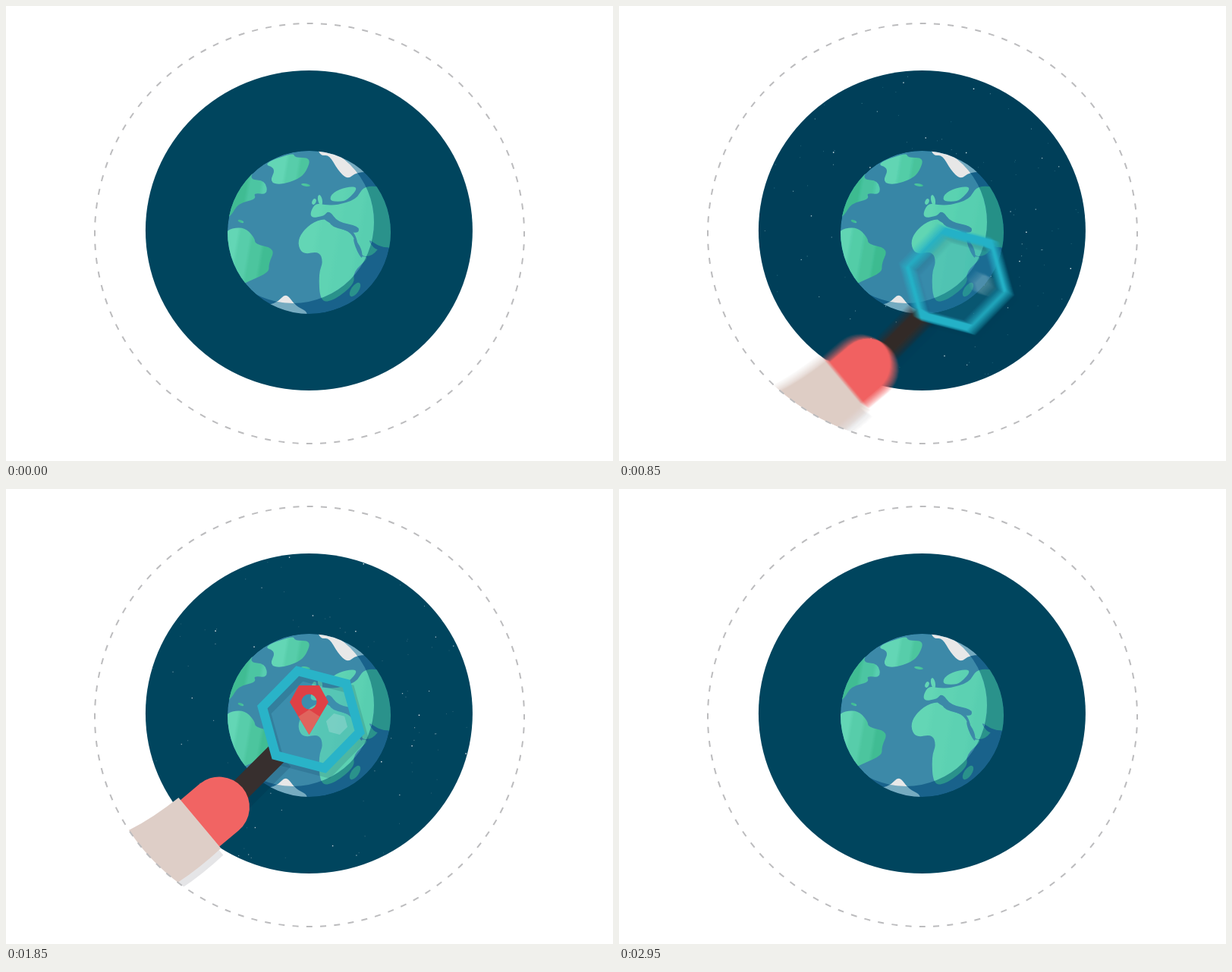
Animation of 800 by 600 pixels, one loop 3.05 s. Source, as an HTML page with a canvas:

```html
<!DOCTYPE html>
<html lang="en">
<head>
<meta charset="utf-8">
<title>Searching the globe</title>
<style>
  html, body { margin: 0; width: 100%; height: 100%; overflow: hidden; background: #fff; }
  canvas { display: block; width: 800px; height: 600px; }
</style>
</head>
<body>
<canvas id="stage" width="800" height="600"></canvas>
<script>
const LOOP = 3050, STEP = 50, LAST = 2950, TAU = Math.PI * 2;
const ctx = document.getElementById('stage').getContext('2d');
const clamp = v => Math.max(0, Math.min(1, v));

const layer = (w, h) => {
  const c = document.createElement('canvas');
  c.width = w;
  c.height = h;
  return c.getContext('2d');
};

const ellipse = (x, y, rx, ry = rx, turn = 0) => {
  const p = new Path2D();
  p.ellipse(x, y, rx, ry, turn, 0, TAU);
  return p;
};

// Regular hexagons around one centre, tilted like the magnifier
const hexagon = (x, y, ...radii) => {
  const p = new Path2D();
  for (const r of radii) {
    for (let i = 0; i < 6; i++) {
      const a = 0.253 + i * TAU / 6;
      p[i ? 'lineTo' : 'moveTo'](x + r * Math.cos(a), y + r * Math.sin(a));
    }
    p.closePath();
  }
  return p;
};

const placed = (path, x, y, degrees) => {
  const p = new Path2D();
  p.addPath(path, new DOMMatrix().translate(x, y).rotate(degrees));
  return p;
};

// Closed outline, rounded at each key point
const coast = (...pts) => {
  const p = new Path2D(), n = pts.length;
  for (let i = 0; i <= n; i++) {
    const [x, y] = pts[i % n], [u, v] = pts[(i + 1) % n];
    const mid = [(x + u) / 2, (y + v) / 2];
    if (i) p.quadraticCurveTo(x, y, ...mid); else p.moveTo(...mid);
  }
  return p;
};

// Slightly tilted bands from one green to another
const bands = (x0, x1, from, to, count = 4) => {
  const g = ctx.createLinearGradient(x0, 300, x1, 300 + (x1 - x0) * 0.17);
  for (let i = 0; i < count; i++) {
    const mix = from.map((c, k) => Math.round(c + (to[k] - c) * i / (count - 1)));
    g.addColorStop((i + 0.15) / count, `rgb(${mix})`);
    g.addColorStop((i + 0.85) / count, `rgb(${mix})`);
  }
  return g;
};

/* ---------- Globe ---------- */
const ring = ellipse(400, 300, 283, 277);
const space = ellipse(399.4, 296, 215.5, 211);
const globe = ellipse(399.5, 298.5, 107.5);
const daylight = ellipse(378, 285, 107);

const pale = [99, 214, 181], deep = [64, 188, 147], mint = [88, 206, 176];
const arctic = bands(338, 402, pale, deep);
const west = bands(290, 344, deep, mint, 3);
const south = bands(290, 356, pale, deep);
const east = bands(384, 490, pale, mint);

const lands = [
  [arctic, coast([338,208], [379,193], [380,200], [402,200], [396,218], [386,228], [362,236], [347,232], [356,214])],
  [arctic, ellipse(395, 236, 6, 1.8, 0.15)],
  [west, coast([284,262], [330,212], [320,229], [342,230], [345,249], [326,246], [330,255], [306,260], [296,278], [284,282])],
  [west, ellipse(309.5, 284, 4, 1.6, 0.4)],
  [south, coast([284,297], [313,290], [328,306], [328,314], [355,320], [346,340], [347,351], [320,363], [310,368], [284,345])],
  [east, coast([406,260], [399,280], [420,277], [425,269], [437,286], [461,297], [466,331], [484,329],
    [493,316], [520,322], [520,244], [487,237], [470,239], [462,255], [435,263], [420,262])],
  [east, coast([390,298], [384,313], [391,328], [413,323], [418,338], [412,352], [414,391], [433,388],
    [460,366], [457,351], [480,330], [464,331], [458,298], [428,291], [425,280], [406,284])],
  [east, coast([426,257], [430,246], [450,238], [465,239], [450,256], [440,258])],
  [east, ellipse(414, 256, 2.8, 7, -0.2)],
  [east, ellipse(406, 258, 2.5, 4, 0.4)],
  [east, ellipse(460, 374, 5, 10.5, 0.6)]
];
const seas = [
  coast([417,279], [426,269], [437,285], [465,290], [465,300], [448,297], [424,285]),
  coast([457,303], [469,320], [470,336], [460,318]),
  coast([476,306], [490,316], [503,319], [487,323])
];
const ice = [
  coast([408,180], [414,198], [426,196], [437,216], [450,229], [462,219], [486,219], [470,186]),
  coast([338,396], [358,391], [369,378], [382,396], [398,403], [395,414], [340,414])
];

function paintGlobe(g, ocean, snow, land) {
  g.fillStyle = ocean;
  g.fill(globe);
  for (const [fill, path] of lands) {
    g.fillStyle = land || fill;
    g.fill(path);
  }
  g.fillStyle = ocean;
  seas.forEach(p => g.fill(p));
  g.fillStyle = snow;
  ice.forEach(p => g.fill(p));
}

const earth = layer(800, 600);
earth.clip(globe);
paintGlobe(earth, '#19628b', '#76abc0', '#2a928b');
earth.clip(daylight);
paintGlobe(earth, '#3c89a8', '#e8e8e8');

/* ---------- Stars ---------- */
let seed = 41;
const rnd = () => (seed = (seed * 16807) % 2147483647) / 2147483647;
const stars = Array.from({ length: 130 }, () => {
  const a = rnd() * TAU, r = 214 * Math.sqrt(rnd()), glow = rnd() ** 3;
  return { x: Math.cos(a) * r, y: Math.sin(a) * r, size: 0.9 + 0.6 * glow, alpha: 0.2 + 0.7 * glow };
});

function drawStars(t) {
  const fade = clamp(t / 400) * clamp((LAST - t) / 300);
  const grow = 1 + 0.057 * (t - 500) / 1000;
  ctx.save();
  ctx.clip(space);
  ctx.fillStyle = '#fff';
  for (const { x, y, size, alpha } of stars) {
    ctx.globalAlpha = alpha * fade;
    ctx.fillRect(400 + x * grow - size / 2, 298 + y * grow - size / 2, size, size);
  }
  ctx.restore();
}

/* ---------- Hand with magnifier, at its resting place ---------- */
const PAD = 200, LENS = [402, 304], TIP = [281, 419.5, -40];
const frame = hexagon(...LENS, 73.3, 59.3);
const handle = placed(new Path2D('M-62-14.5V14.5H-150V-14.5Z'), ...LENS, -45);
const finger = placed(new Path2D('M-34-40H0A40 40 0 0 1 0 40H-34Z'), ...TIP);
const sleeve = placed(new Path2D('M-33-44Q-75-45-110-53L-300-105V0L-106 41Q-70 45-33 43Z'), ...TIP);

const hand = layer(800 + PAD, 800 + PAD);
hand.translate(PAD, PAD);
const paint = (path, color, dx = 0, dy = 0) => {
  hand.fillStyle = color;
  hand.fill(placed(path, dx, dy, 0), 'evenodd');
};
paint(hexagon(...LENS, 60), 'rgba(62,160,188,.25)');
paint(frame, 'rgba(0,40,75,.15)', 5, 7);
paint(handle, 'rgba(0,30,60,.14)', 7, 8);
paint(sleeve, 'rgba(20,20,40,.11)', 3, 9);
paint(hexagon(436, 310, 14.5), 'rgba(215,235,240,.26)');
paint(handle, '#372f2e');
paint(frame, '#29b3c8');
paint(finger, '#f16463');
paint(sleeve, '#decec7');

// Key points of the search: time, then offset from the resting place
const ARRIVE = 1200, LEAVE = 2400;
const search = [[100, -350, -40], [500, -138, -83], [850, 43, 57], [1000, 50, 30], [ARRIVE, 0, 0]];

function place(t) {
  if (t >= LEAVE) {
    const u = (t - LEAVE) / 150;
    return [-38 * u ** 1.5, 22 * u ** 2.4];
  }
  if (t >= ARRIVE) return [0, 0];
  t = Math.max(t, search[0][0]);
  const i = search.findIndex(p => p[0] > t) - 1;
  const a = search[i], b = search[i + 1], span = b[0] - a[0], u = (t - a[0]) / span;
  const slope = (k, d) => {
    const p = search[k - 1], q = search[k + 1];
    return p && q ? (q[d] - p[d]) / (q[0] - p[0]) * span : 0;
  };
  const ease = u * u * (3 - 2 * u);
  return [1, 2].map(d => a[d] + (b[d] - a[d]) * ease
    + u * (1 - u) * ((1 - u) * slope(i, d) - u * slope(i + 1, d)));
}

// Motion blur: running average of the scene over the shutter time
const scene = layer(800, 600);
function drawHand(t) {
  if (t <= 100 || t > 2800) return;
  const copies = t >= ARRIVE && t <= LEAVE ? 1 : 12, shutter = 36;
  const backdrop = layer(800, 600);
  backdrop.drawImage(ctx.canvas, 0, 0);
  ctx.save();
  ctx.clip(ring);
  for (let k = 0; k < copies; k++) {
    const [x, y] = place(t + ((k + 0.5) / copies - 0.5) * shutter);
    scene.drawImage(backdrop.canvas, 0, 0);
    scene.drawImage(hand.canvas, x - PAD, y - PAD);
    ctx.globalAlpha = 1 / (k + 1);
    ctx.drawImage(scene.canvas, 0, 0);
  }
  ctx.restore();
}

/* ---------- Map pin ---------- */
const pin = new Path2D('M374 281L386 259H413L425 281L399.5 324Z');
pin.addPath(ellipse(399.5, 280.5, 10));
const facet = new Path2D('M385.5 300L399.5 291L413.5 300L399.5 324Z');

function drawPin(t) {
  const u = t - ARRIVE;
  if (u <= 0 || t >= 2450) return;
  const spring = 1 - Math.exp(-u / 90) * Math.cos(u * TAU / 250);
  const scale = spring * (1 - clamp((t - 2330) / 120) ** 2);
  ctx.save();
  ctx.translate(399.5, 324);
  ctx.scale(scale, scale);
  ctx.translate(-399.5, -324);
  ctx.fillStyle = '#df4045';
  ctx.fill(pin, 'evenodd');
  ctx.fillStyle = '#e0645d';
  ctx.fill(facet);
  ctx.restore();
}

function drawRing() {
  const period = 1759.5 / 96;
  ctx.save();
  ctx.strokeStyle = '#bcbcbe';
  ctx.lineWidth = 2;
  ctx.setLineDash([8, period - 8]);
  ctx.lineDashOffset = 4;
  ctx.stroke(ring);
  ctx.restore();
}

function draw(t) {
  ctx.fillStyle = '#fff';
  ctx.fillRect(0, 0, 800, 600);
  ctx.fillStyle = '#00455e';
  ctx.fill(space);
  drawStars(t);
  ctx.drawImage(earth.canvas, 0, 0);
  drawHand(t);
  drawPin(t);
  drawRing();
}

const start = performance.now();
let shown = -1;
function tick() {
  const now = Math.max(0, performance.now() - start) % LOOP;
  const t = Math.min(LAST, Math.floor(now / STEP) * STEP);
  if (t !== shown) draw(shown = t);
  requestAnimationFrame(tick);
}
tick();
</script>
</body>
</html>
```
